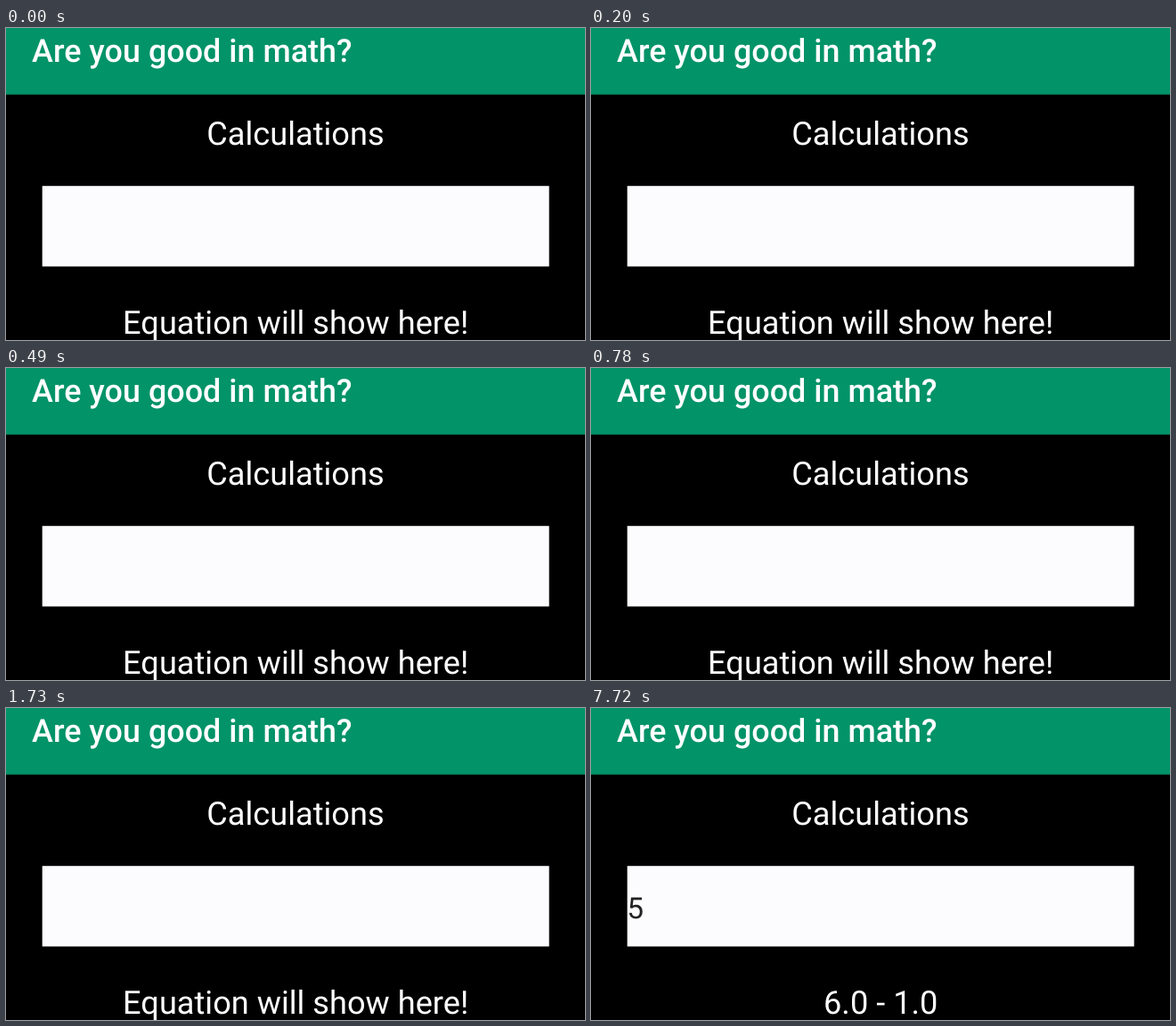
Recreate the animation shown at these times as an HTML page. Size 650x350 px, loop 8000 ms.

```html
<!DOCTYPE html>
<html lang="en">
<head>
<meta charset="utf-8">
<title>Are you good in math?</title>
<style>
  html, body { margin: 0; width: 100%; height: 100%; overflow: hidden; background: #000; }
  svg { display: block; width: 650px; height: 350px; font: 36.2px Roboto, sans-serif; fill: #fff; text-rendering: geometricPrecision; }
  .title { font-size: 35.9px; font-weight: 500; }
  .centered { text-anchor: middle; }
  .answer { font-size: 33px; fill: #222; }

  .hint, .equation, .answer { animation: 8s step-end infinite; }
  .hint { animation-name: hint; }
  .equation { animation-name: equation; }
  .answer { animation-name: answer; }

  @keyframes hint { 0% { opacity: 1; } 67.875%, 100% { opacity: 0; } }
  @keyframes equation { 0% { opacity: 0; } 67.875%, 100% { opacity: 1; } }
  @keyframes answer { 0% { opacity: 0; } 96.5%, 100% { opacity: 1; } }
</style>
</head>
<body>
<svg viewBox="0 0 650 350">
  <rect width="650" height="350" fill="#000"/>
  <rect width="650" height="74.7" fill="#029368"/>
  <text class="title" x="29" y="38">Are you good in math?</text>
  <text class="centered" x="325" y="131">Calculations</text>
  <rect x="40.7" y="177.2" width="569" height="90.3" fill="#fcfcfe"/>
  <text class="answer" x="40.5" y="235.5">5</text>
  <text class="centered hint" x="325.2" y="342.5">Equation will show here!</text>
  <text class="centered equation" x="325.2" y="342.5">6.0 - 1.0</text>
</svg>
</body>
</html>
```
